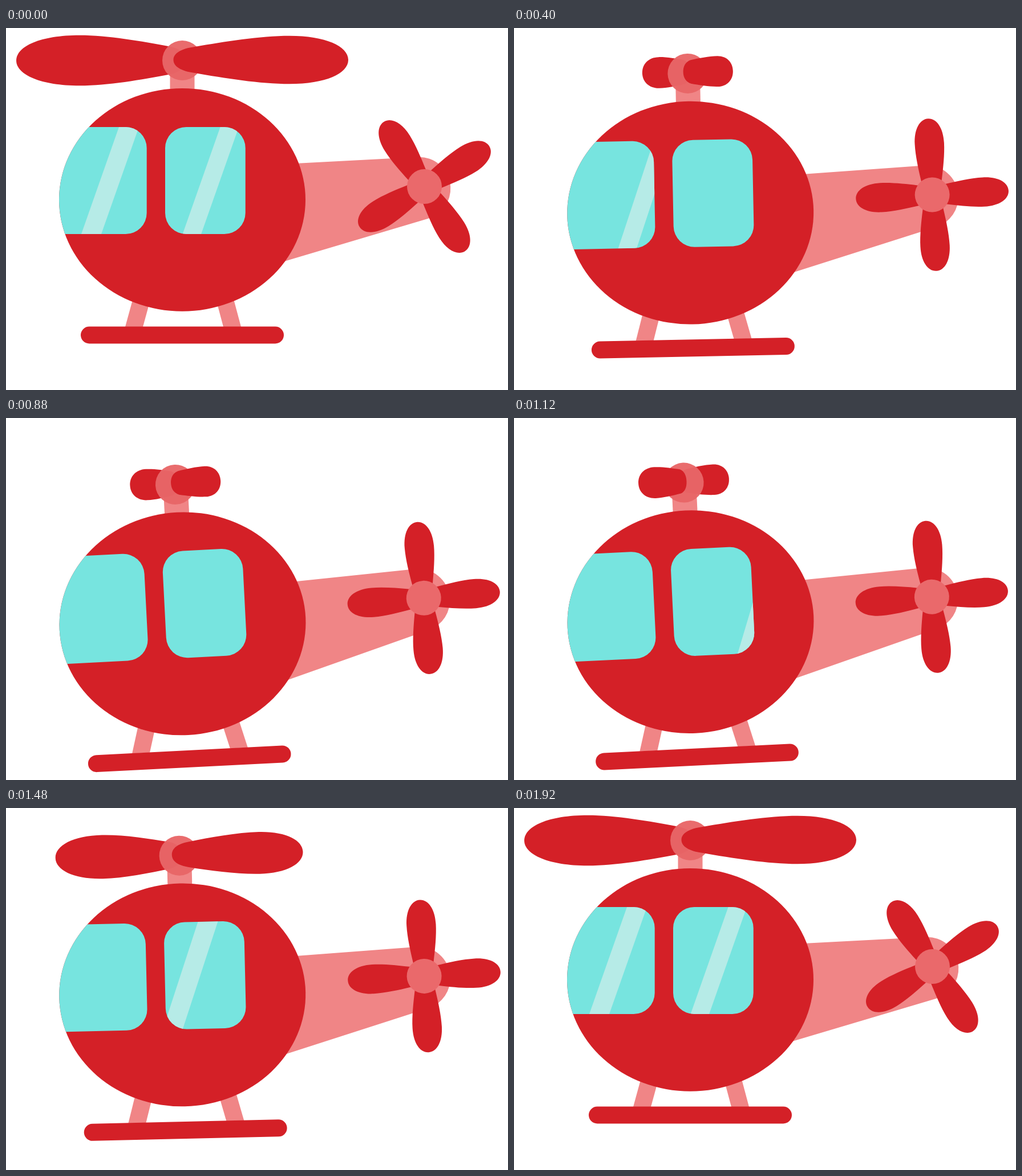
Recreate the animation shown at these times as an HTML page with a canvas. Size 880 by 636 pixels, loop 1960 ms.

```html
<!DOCTYPE html>
<html lang="en">
<head>
<meta charset="utf-8">
<title>Helicopter</title>
<style>
html, body { margin: 0; width: 100%; height: 100%; overflow: hidden; background: #fff; }
canvas { display: block; }
</style>
</head>
<body>
<canvas id="stage" width="880" height="636"></canvas>
<script>
const ctx = document.getElementById('stage').getContext('2d');
const RED = '#d42027', PINK = '#f08586', HUB = 'rgba(233,103,104,0.96)';
const GLASS = '#77e4df', SHINE = '#b6ebe7';
const STEP = 40, LAST = 48, LOOP = 1960;

const mix = (a, b, k) => a + (b - a) * k;
const smooth = s => s * s * (3 - 2 * s);
const rad = deg => deg * Math.PI / 180;

// A blade lies along +x: root, neck, widest part (belly) and tip, with half heights.
const wide = { root: -15.5, neck: 22, neckH: 23, belly: 188, bellyH: 42.3, tip: 291, mid: -1 };
const thin = { root: -5, neck: 0, neckH: 20, belly: 5, bellyH: 21.4, tip: 5.5, mid: -3.3 };
const wideLeft = { ...wide, root: -5, neckH: 24.5, belly: 180, bellyH: 44.3, mid: 0 };
const tailShape = { root: 0, neck: 25, neckH: 18, belly: 90, bellyH: 25.7, tip: 134, mid: 0 };

function bladePath({ root, neck, neckH, belly, bellyH, tip, mid }) {
  const edge = [
    [root, 0], [root, neckH / 2],
    [mix(neck, root, 0.65), neckH * 0.86], [neck, neckH],
    [mix(neck, belly, 0.31), mix(neckH, bellyH, 0.47)],
    [mix(neck, belly, 0.69), bellyH], [belly, bellyH],
    [mix(belly, tip, 0.61), bellyH], [tip, bellyH * 0.57], [tip, 0]
  ];
  const back = edge.slice(0, -1).reverse().map(([x, y]) => [x, -y]);
  const pts = edge.concat(back).map(([x, y]) => [x, y + mid]);
  const path = new Path2D();
  path.moveTo(...pts[0]);
  for (let i = 1; i < pts.length; i += 3) path.bezierCurveTo(...pts.slice(i, i + 3).flat());
  return path;
}

function blend(a, b, k) {
  const out = {};
  for (const key in a) out[key] = mix(a[key], b[key], k);
  return out;
}

const tailBlade = bladePath(tailShape);

const body = new Path2D();
body.ellipse(309, 301.8, 216, 195.9, 0, 0, Math.PI * 2);

const panes = new Path2D();
panes.roundRect(40, 174, 206.7, 188, 37);
panes.roundRect(279, 174, 140.7, 188, 37);

const tail = new Path2D();
tail.moveTo(450, 241);
tail.arc(724, 282, 55.3, -1.623, 1.288);
tail.lineTo(450, 421.2);

function fill(color, path) {
  ctx.fillStyle = color;
  ctx.fill(path);
}

function disc(color, x, y, r) {
  const path = new Path2D();
  path.arc(x, y, r, 0, Math.PI * 2);
  fill(color, path);
}

// Slanted bar with level ends: x1 at y1, x2 at y2.
function bar(color, x1, y1, x2, y2, w) {
  const path = new Path2D();
  path.moveTo(x1, y1);
  path.lineTo(x2, y2);
  path.lineTo(x2 + w, y2);
  path.lineTo(x1 + w, y1);
  fill(color, path);
}

function drawBlade(side, shape) {
  ctx.save();
  ctx.translate(309, 57);
  ctx.scale(side, 1);
  fill(RED, bladePath(shape));
  ctx.restore();
}

function drawRotor(n) {
  const k = smooth(1 - Math.abs(n % 6 - 3) / 3);
  const left = () => drawBlade(-1, blend(wideLeft, thin, k));
  const right = () => drawBlade(1, blend(wide, thin, k));
  const leftFront = Math.floor((n + 3) / 6) % 2 === 1;
  const [back, front] = leftFront ? [right, left] : [left, right];
  back();
  disc(HUB, 309, 57, 35);
  front();
}

function drawTailRotor(n) {
  ctx.save();
  ctx.translate(733.5, 278.5);
  ctx.rotate(rad(30 * n - 32));
  for (let i = 0; i < 4; i++) {
    fill(RED, tailBlade);
    ctx.rotate(Math.PI / 2);
  }
  ctx.restore();
  disc('#ea696b', 733.5, 278.5, 30.5);
}

function drawWindows(n) {
  ctx.save();
  ctx.clip(body);
  fill(GLASS, panes);
  ctx.clip(panes);
  const travel = 616;
  for (const start of [0, travel]) {
    const x = 132 + start - travel * n / LAST;
    bar(SHINE, x, 362, x + 66, 174, 35);
    bar(SHINE, x + 177.6, 362, x + 243.6, 174, 32.5);
  }
  ctx.restore();
}

function draw(n) {
  ctx.fillStyle = '#fff';
  ctx.fillRect(0, 0, 880, 636);
  const sink = smooth(1 - Math.abs(n - 24) / 24);
  ctx.save();
  ctx.translate(309, 292 + 60.8 * sink);
  ctx.rotate(rad(-3 * sink));
  ctx.translate(-309, -292);

  fill(PINK, tail);
  drawTailRotor(n);
  bar(PINK, 287.5, 125, 287.5, 70, 43);
  drawRotor(n);
  bar(PINK, 209, 525, 226.5, 461, 31);
  bar(PINK, 381, 525, 365, 465, 31);
  fill(RED, body);
  drawWindows(n);
  const skid = new Path2D();
  skid.roundRect(131, 524.5, 356, 30, 15);
  fill(RED, skid);
  ctx.restore();
}

const begin = performance.now();
function tick() {
  const t = (performance.now() - begin) % LOOP;
  draw(Math.min(LAST, Math.floor(t / STEP)));
  requestAnimationFrame(tick);
}
tick();
</script>
</body>
</html>
```
